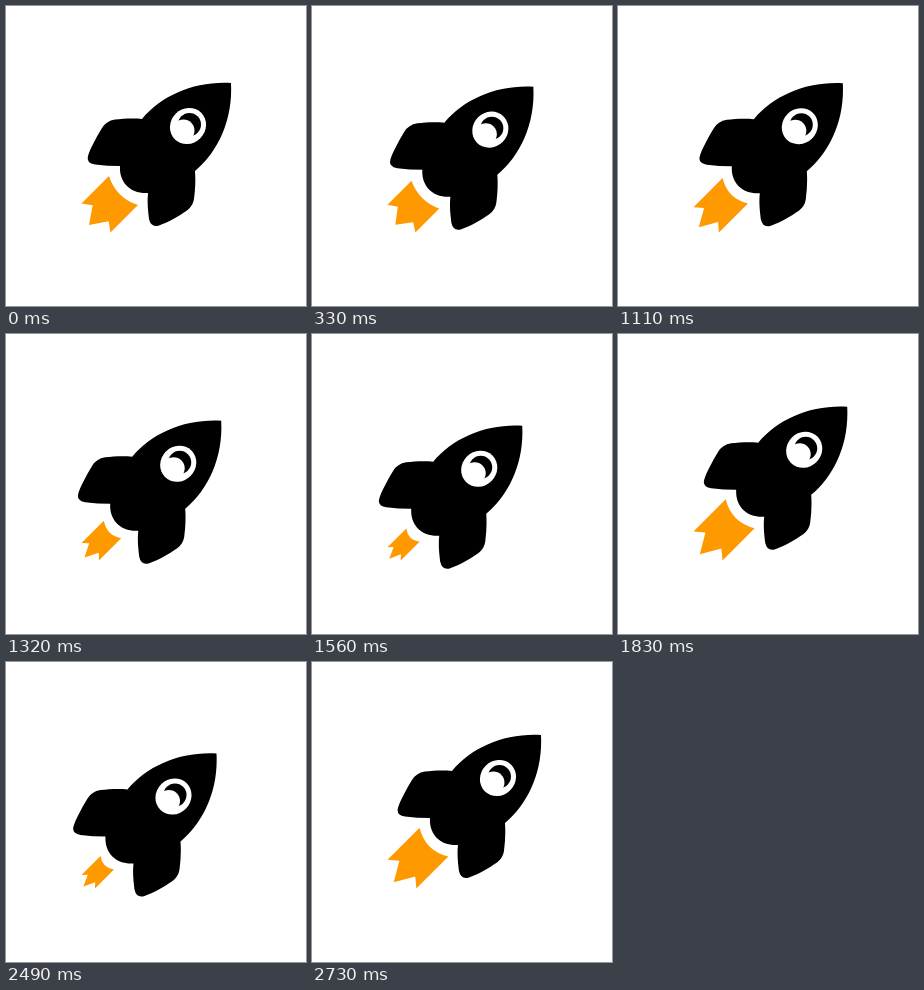
These frames come from a looping animation (300x300 px, 2760 ms). An HTML page:

```html
<!DOCTYPE html>
<html lang="en">
<head>
<meta charset="utf-8">
<title>Rocket</title>
<style>
  html, body { margin: 0; width: 100%; height: 100%; overflow: hidden; background: #fff; }
  svg { display: block; width: 100%; height: 100%; }
</style>
</head>
<body>
<svg viewBox="0 0 300 300">
  <g id="rocket">
    <path d="M225 77C189 75 156 89 136 113C126 112 116 113 109 113.5Q100 115 96 122
      C90 132 84 143 82 150Q80 157 89 158.5Q101 160 114 160
      C113 176 124 188 142 187C141 196 142 205 143 213Q145 222 153 219.500
      C163 216 173 210 181 204.500Q187 200 188 193Q190 178 189 165C212 146 227 114 225 77Z"/>
    <ellipse rx="18.7" ry="17.4" transform="translate(182 120) rotate(-45)" fill="#fff"/>
    <circle cx="183.500" cy="118.500" r="11.500"/>
    <circle cx="177.500" cy="124.500" r="11" fill="#fff"/>
  </g>
  <path id="flame" fill="#f90"
    d="M-14.500 0Q0 8 14.500 0V29.500L8 24.500L0 37L-8 24.500L-14.500 29.500Z"/>
</svg>
<script>
const LOOP = 2760, CYCLE = LOOP / 3, FALL = 630, LEAD = 10;
const TOP = 4.2;           // highest point of the flight along the diagonal
const TAIL_X = 75.5;       // the flame's tail stays here while its root moves
const HALF_WIDTH = 14.5, TAIL = 29.5;
const gentle = { from: 0, low: -6.5, narrow: 0.93 };
const strong = { from: TOP, low: -15, narrow: 0.45 };

const rocket = document.getElementById("rocket");
const flame = document.getElementById("flame");
const ease = p => (1 - Math.cos(Math.PI * p)) / 2;
const mix = (a, b, p) => a + (b - a) * p;

function draw(now) {
  const time = Math.floor((now % LOOP) / 30) * 30 + LEAD;
  const phase = time % CYCLE;
  const falling = phase < FALL;
  const { from, low, narrow } = time < CYCLE ? gentle : strong;

  // The rocket sinks slowly as the flame shrinks, then shoots back up.
  const sink = ease(falling ? phase / FALL : (CYCLE - phase) / (CYCLE - FALL));
  const shift = mix(falling ? from : TOP, low, sink);
  const width = mix(1, narrow, sink);
  const rootX = 117.5 + shift * 1.12;
  const rootY = 184.5 - shift * 1.12;
  const length = (rootX - HALF_WIDTH * width - TAIL_X) / TAIL;

  rocket.setAttribute("transform", `translate(${shift} ${-shift})`);
  // The flame's own axes lie on the two diagonals.
  flame.setAttribute("transform",
    `matrix(${width} ${width} ${-length} ${length} ${rootX} ${rootY})`);
}

const start = performance.now();
function tick() {
  draw(performance.now() - start);
  requestAnimationFrame(tick);
}
tick();
</script>
</body>
</html>
```
